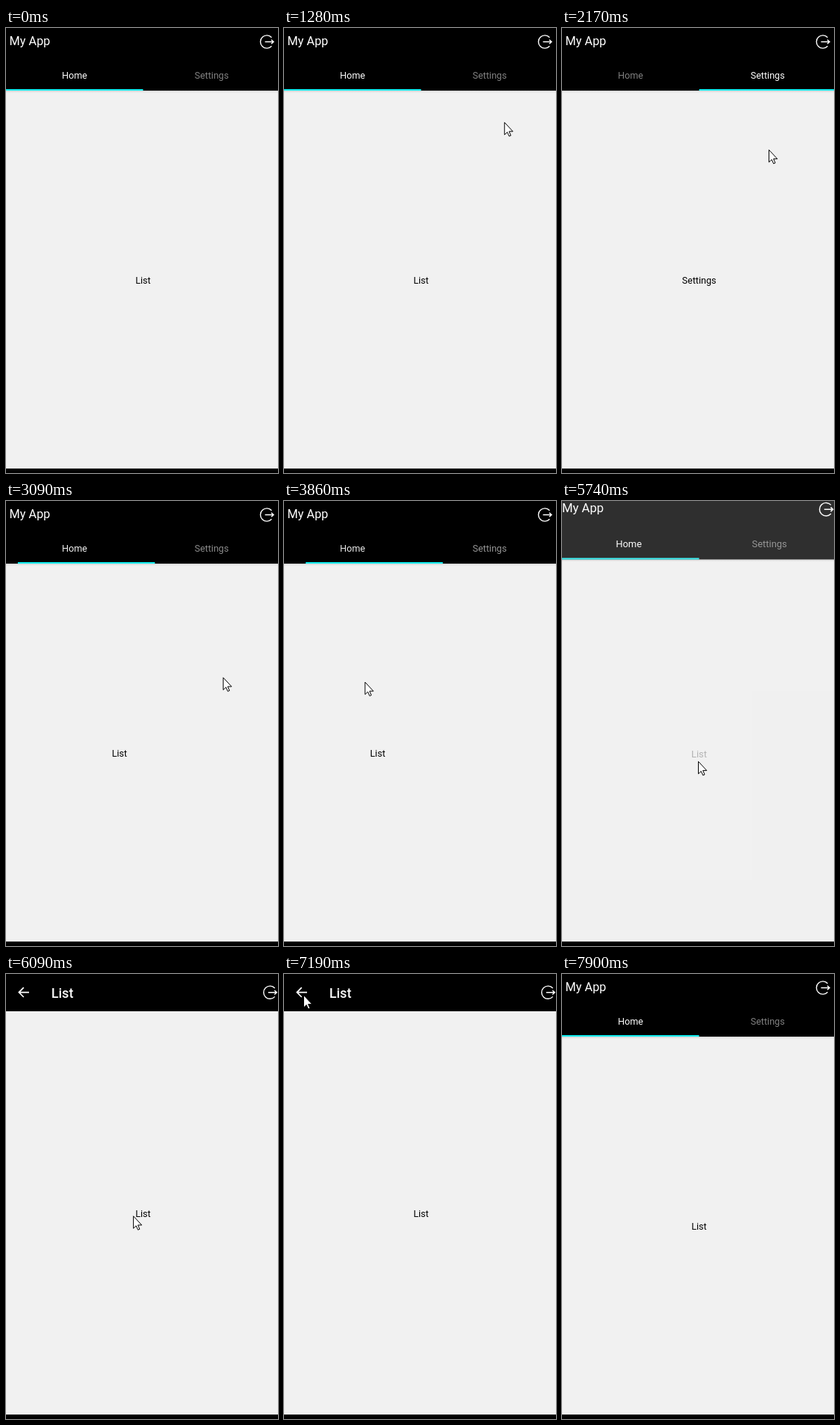
Animation, 366 px wide and 597 px high, one loop 8.83 s. Source, as an HTML page:

```html
<!DOCTYPE html>
<html lang="en">
<head>
<meta charset="utf-8">
<title>Tabs demo</title>
<style>
  html, body { margin: 0; width: 100%; height: 100%; overflow: hidden; background: #f1f1f1; }
  svg { display: block; width: 100%; height: 100%; font-family: Roboto, sans-serif; font-size: 12.6px; }
  .mid { text-anchor: middle; }
  .line { fill: none; stroke: #fff; }
</style>
</head>
<body>
<svg viewBox="0 0 366 597">
  <defs>
    <linearGradient id="shade" x2="0" y2="1">
      <stop offset="0" stop-color="#d4d4d4"/>
      <stop offset="1" stop-color="#f1f1f1"/>
    </linearGradient>
    <g id="exit" class="line" stroke-width="1.4">
      <path d="M6.4 -5.7A8.6 8.6 0 1 0 6.4 5.7"/>
      <path d="M-2.5 0H9M6 -2.8L9 0L6 2.8"/>
    </g>
  </defs>
  <rect width="366" height="597" fill="#f1f1f1"/>

  <g id="main">
    <rect width="369" height="591" fill="#f1f1f1"/>
    <g id="pager">
      <text id="link" class="mid" x="184.5" y="342.5">List</text>
      <text class="mid" x="553.5" y="342.5">Settings</text>
    </g>
    <rect y="84" width="369" height="3" fill="url(#shade)"/>
    <rect width="369" height="84"/>
    <text x="4.6" y="22.6" font-size="16.3" fill="#fff">My App</text>
    <use href="#exit" x="351" y="18.5"/>
    <text id="tabHome" class="mid" x="92.3" y="67.5" fill="#fff">Home</text>
    <text id="tabSettings" class="mid" x="276.7" y="67.5" fill="#fff">Settings</text>
    <rect id="bar" y="82" width="184.5" height="2" fill="#14eef0"/>
  </g>

  <g id="detail">
    <rect width="369" height="591" fill="#f1f1f1"/>
    <rect width="369" height="50"/>
    <path class="line" stroke-width="1.7" d="M31 24.6H17.5M23.8 18.2L17.4 24.6L23.8 31"/>
    <text x="61" y="31.6" font-size="18" font-weight="500" fill="#fff">List</text>
    <use href="#exit" x="355.3" y="24.7"/>
    <text class="mid" x="184.5" y="325.5">List</text>
  </g>

  <rect y="591" width="366" height="6"/>
  <path id="cursor" d="M.5 .5V17L4.2 13.5L6.7 19L9 18L6.6 12.6H11.8Z" fill="#fff" stroke="#000"/>
</svg>
<script>
const LOOP = 8830, PAGE = 369, ENTER = 650, LEAVE = 7830;
const el = id => document.getElementById(id);
const set = (id, name, value) => el(id).setAttribute(name, value);
const clamp = (v, a = 0, b = 1) => Math.min(b, Math.max(a, v));
const mix = (a, b, u) => a + (b - a) * u;

// Progress from 0 to 1 between two times
function ease(t, from, to) {
  const u = clamp((t - from) / (to - from));
  return u * u * (3 - 2 * u);
}

const home = { x: 186, y: 590 };
const moves = [
  { from: ENTER, to: 1460, x: 312, y: 60 },
  { from: 1640, to: 2170, x: 278, y: 163 },
  { from: 2170, to: 2600, x: 60, y: 226 },
  { from: 2600, to: 2960, x: 300, y: 236 },
  { from: 3000, to: 3600, x: 167, y: 242 },
  { from: 3670, to: 4050, x: 51, y: 243 },
  { from: 4050, to: 4400, x: 16, y: 245 },
  { from: 4400, to: 4740, x: 307, y: 247 },
  { from: 4740, to: 5180, x: 183, y: 349 },
  { from: 5880, to: 7120, x: 26, y: 28 },
  { from: 7300, to: LEAVE, x: 120, y: 600 }
];

// A tab press is a swipe of no length
const swipes = [
  { down: 1620, up: 1620, goal: PAGE },
  { down: 2600, up: 2960, goal: 0 },
  { down: 3670, up: 4050, goal: PAGE },
  { down: 4400, up: 4740, goal: 0 }
];

function pointer(t) {
  return moves.reduce((p, m) => {
    const u = ease(t, m.from, m.to);
    return { x: mix(p.x, m.x, u), y: mix(p.y, m.y, u) };
  }, home);
}

// The page follows the pointer while held, then settles on its goal
function scroll(t) {
  let x = 0;
  for (const { down, up, goal } of swipes) {
    if (t < down) break;
    x = clamp(x + pointer(down).x - pointer(Math.min(t, up)).x, 0, PAGE);
    const rest = 1 - clamp((t - up) / 260);
    x = mix(goal, x, rest * rest);
  }
  return x;
}

function zoom(id, scale, opacity) {
  set(id, "transform", `translate(184.5 295.5) scale(${scale}) translate(-184.5 -295.5)`);
  set(id, "opacity", opacity);
}

function draw(t) {
  const x = scroll(t), part = x / PAGE;
  set("pager", "transform", `translate(${-x})`);
  set("bar", "x", x / 2);
  set("tabHome", "opacity", 1 - part / 2);
  set("tabSettings", "opacity", 0.5 + part / 2);

  const pressed = ease(t, 5390, 5530) - ease(t, 5760, 6000);
  set("link", "opacity", 1 - 0.69 * pressed);

  const open = ease(t, 5600, 6020) - ease(t, 7240, 7600);
  zoom("main", 1 + open * 0.1, 1 - open * 0.75);
  zoom("detail", 0.87 + open * 0.13, clamp(open * 8 - 6));

  const p = pointer(t);
  set("cursor", "visibility", t >= ENTER && t < LEAVE ? "visible" : "hidden");
  set("cursor", "transform", `translate(${p.x} ${p.y})`);
}

const begin = performance.now();
function frame() {
  draw((performance.now() - begin) % LOOP);
  requestAnimationFrame(frame);
}
frame();
</script>
</body>
</html>
```
